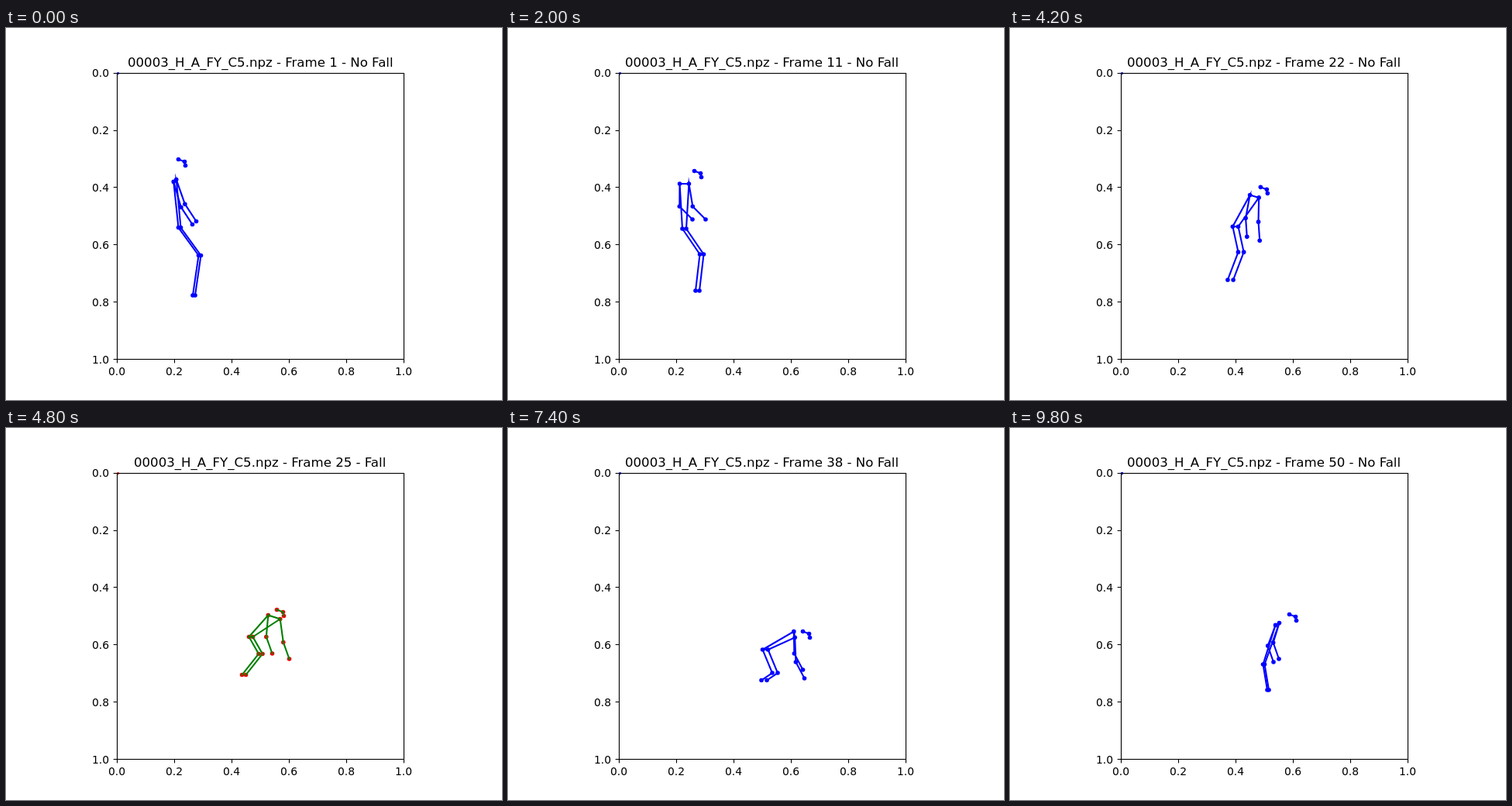
An HTML page with a canvas that plays this animation: 640 px wide and 480 px high, repeating every 10000 ms.

```html
<!DOCTYPE html>
<html lang="en">
<head>
<meta charset="utf-8">
<title>Pose plot</title>
<style>
  html, body { margin: 0; width: 100%; height: 100%; overflow: hidden; background: #fff; }
  canvas { display: block; }
</style>
</head>
<body>
<canvas id="stage" width="640" height="480"></canvas>
<script>
const ctx = document.getElementById("stage").getContext("2d");
const STEP = 200, STEPS = 50;
const LEFT = 143.2, TOP = 57.6, SIZE = 369.6;
const ORIGIN = [LEFT, TOP];
const EMPTY_STEP = 30, FALL_START = 23, FALL_END = 28;

// Key poses of the body's centre line; the gaps part the two sides.
const poses = [
  { step: 1, head: [230.5, 172.5], shoulder: [218, 197], wrist: [243, 251.5], elbowBend: 4,
    hip: [224, 257.5], knee: [250, 293.5], ankle: [242.5, 345], armGap: [5, -4], legGap: 3 },
  { step: 11, head: [248.5, 187.5], shoulder: [227.5, 201], wrist: [246.5, 247], elbowBend: 9,
    hip: [227.5, 259], knee: [250, 292], ankle: [244.5, 339], armGap: [17, 0], legGap: 5 },
  { step: 18, head: [296.5, 169.5], shoulder: [274.5, 181.5], wrist: [260, 241.5], elbowBend: 0,
    hip: [257.5, 238.5], knee: [257.5, 286], ankle: [254.5, 333.5], armGap: [9, 2], legGap: 10 },
  { step: 25, head: [357.5, 237.5], shoulder: [346, 244], wrist: [354.5, 294.5], elbowBend: 4,
    hip: [316, 269.5], knee: [328.5, 291.5], ankle: [307, 318.5], armGap: [22, 7], legGap: 5 },
  { step: 38, head: [388.5, 265.5], shoulder: [369.5, 266.5], wrist: [381.5, 317.5], elbowBend: 6,
    hip: [332, 286], knee: [344.5, 316], ankle: [330.5, 325.5], armGap: [2, 11], legGap: 7 },
  { step: 50, head: [368.5, 243.5], shoulder: [345, 253], wrist: [343.5, 300], elbowBend: 8,
    hip: [327.5, 305], knee: [333, 338], ankle: [326.5, 354], armGap: [7, -4], legGap: 2 },
];

function blend(a, b, mix) {
  return Array.isArray(a) ? a.map((v, i) => blend(v, b[i], mix)) : a + (b - a) * mix;
}

function poseAt(step) {
  const i = Math.max(1, poses.findIndex(p => p.step >= step));
  const from = poses[i - 1], to = poses[i];
  const mix = (step - from.step) / (to.step - from.step);
  return Object.fromEntries(Object.keys(from).map(key => [key, blend(from[key], to[key], mix)]));
}

function elbowOf({ shoulder, wrist, elbowBend }) {
  const [x, y] = blend(shoulder, wrist, 0.56);
  const dx = wrist[0] - shoulder[0], dy = wrist[1] - shoulder[1];
  const bend = elbowBend / Math.hypot(dx, dy);
  return [x - dy * bend, y + dx * bend];
}

// One side as a chain from wrist to ankle; undetected joints are null.
function sideAt(pose, side) {
  const { step, shoulder, wrist, hip, knee, ankle, armGap, legGap } = pose;
  const arm = ([x, y], spread) => [x + side * armGap[0] * spread / 2, y + side * armGap[1] * spread / 2];
  const leg = ([x, y]) => [x + side * legGap / 2, y];
  const wristHidden = side < 0 && step > 16 && step < 20;
  return [
    wristHidden ? null : arm(wrist, 1), arm(elbowOf(pose), 1), arm(shoulder, 0.7),
    leg(hip), leg(knee), step < 49 ? leg(ankle) : null,
  ];
}

function polyline(points) {
  ctx.beginPath();
  for (const [x, y] of points) ctx.lineTo(x, y);
  ctx.stroke();
}

function drawSkeleton(step, falling) {
  const pose = poseAt(step);
  const [x, y] = pose.head;
  const head = [[x - 8, y - 3], [x, y], [x + 1, y + 5]];
  const left = sideAt(pose, -1), right = sideAt(pose, 1);
  const empty = step === EMPTY_STEP;
  ctx.save();
  ctx.beginPath();
  ctx.rect(LEFT, TOP, SIZE, SIZE);
  ctx.clip();
  ctx.fillStyle = falling ? "#f00" : "#00f";
  for (const joint of [null, null, ...head, ...left, ...right]) {
    ctx.beginPath();
    ctx.arc(...(empty || !joint ? ORIGIN : joint), 2.8, 0, Math.PI * 2);
    ctx.fill();
  }
  ctx.strokeStyle = falling ? "#008000" : "#00f";
  ctx.lineWidth = 2.083;
  ctx.lineCap = "square";
  if (!empty) {
    const links = [head, left, right, [left[2], right[2]], [left[3], right[3]]];
    for (const link of links) polyline(link.filter(Boolean));
  }
  ctx.restore();
}

// The anchor is the share of the text's width that lies left of x.
function text(string, x, baseline, size, anchor) {
  ctx.font = `${size}px "DejaVu Sans", sans-serif`;
  ctx.fillText(string, Math.round(x - anchor * ctx.measureText(string).width), baseline);
}

function drawAxes() {
  const snap = v => Math.round(v) + 0.5;
  const left = snap(LEFT), top = snap(TOP);
  const right = snap(LEFT + SIZE), bottom = snap(TOP + SIZE);
  ctx.strokeStyle = ctx.fillStyle = "#000";
  ctx.lineWidth = 1.11;
  ctx.strokeRect(left, top, right - left, bottom - top);
  for (let i = 0; i <= 5; i++) {
    const x = LEFT + SIZE * i / 5, y = TOP + SIZE * i / 5;
    const label = (i / 5).toFixed(1);
    polyline([[snap(x), bottom], [snap(x), bottom + 4.86]]);
    polyline([[left - 4.86, snap(y)], [left, snap(y)]]);
    text(label, x, 448, 13.89, 0.5);
    text(label, LEFT - 9.72, Math.round(y + 5.6), 13.89, 1);
  }
}

function draw() {
  const step = Math.floor(performance.now() / STEP) % STEPS + 1;
  const falling = step >= FALL_START && step <= FALL_END;
  ctx.fillStyle = "#fff";
  ctx.fillRect(0, 0, 640, 480);
  drawSkeleton(step, falling);
  drawAxes();
  text(`00003_H_A_FY_C5.npz - Frame ${step} - ${falling ? "Fall" : "No Fall"}`,
    LEFT + SIZE / 2, 50, 16.6, 0.5);
  requestAnimationFrame(draw);
}
draw();
</script>
</body>
</html>
```
